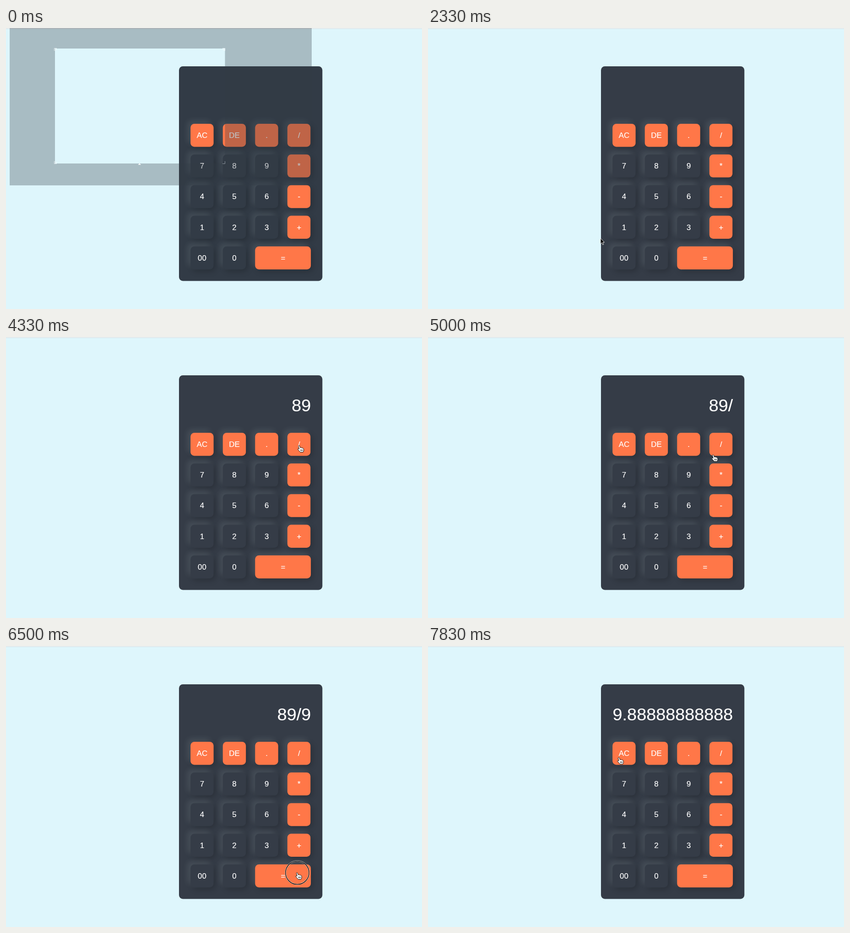
Write an HTML page that moves like this. It is 909 px wide and 616 px high and loops after 8 s.

```html
<!DOCTYPE html>
<html lang="en">
<head>
<meta charset="utf-8">
<title>Calculator</title>
<style>
html, body { margin: 0; width: 100%; height: 100%; overflow: hidden; }
body { position: relative; background: #def6fc; font-family: "Liberation Sans", Arial, sans-serif; color: #fff; }
body::before { content: ""; position: absolute; width: 100%; height: 1px; background: #f4f8f9; border-bottom: 1px solid #d3dcdf; }
#panel {
  position: absolute; left: 378px; top: 84px; width: 373.3px; height: 560px; border-radius: 10px;
  background: var(--dark); transform: scale(.84); transform-origin: 0 0; -webkit-text-stroke: .25px #fff;
}
#display { position: absolute; right: 30px; top: 49px; font-size: 45px; line-height: 60px; white-space: pre; }
.key {
  position: absolute; width: 60px; height: 60px; border-radius: 10px;
  background: var(--dark); font-size: 20px; line-height: 60px; text-align: center;
  box-shadow: -8px -8px 15px rgba(235,255,255,.1), 5px 5px 15px rgba(0,0,0,.2);
}
.op { background: #ff7748; }
.wide { width: 145px; }
svg { position: absolute; left: 0; top: 0; }
</style>
</head>
<body>
<div id="panel"><div id="display"></div></div>
<svg width="909" height="616" fill="none">
  <g id="selection">
    <path d="M8 0H668V345H8ZM107 45V297H478.5V45Z" fill="#323b46" fill-opacity=".31" fill-rule="evenodd"/>
    <path d="M105.5 50V44.5H111M108 50V47H111M473 44.5H478.5V50M473 47H476V50M105.5 292V297.5H111M108 292V295H111" stroke="#fff" stroke-opacity=".75"/>
    <path d="M473 297.5H478.5V292" stroke="#8d959d"/>
    <path d="M288.5 300L291.7 296.5L295 300Z" fill="#fff"/>
  </g>
  <g id="cursor">
    <g id="ring">
      <circle r="25.6" stroke="#fff" stroke-opacity=".75" stroke-width="2.8"/>
      <circle r="25.6" stroke="#111" stroke-width="1.5"/>
    </g>
    <path id="arrow" d="M0 0V12.2L2.8 9.6L4.8 14.2L6.8 13.3L4.9 8.9H8.5Z" fill="#000" stroke="#fff" stroke-width=".9"/>
    <g id="hand" stroke="#111" stroke-linejoin="round">
      <path d="M-2 1.2C-2-.4 .3-.5 .8 1L2.2 5C3.5 4 4.6 4.5 5 5.3C6 4.6 7 5 7.4 6C8.6 5.6 9.2 6.4 9.4 7.5L9.6 11L8.2 14.5H2L-1.5 10.5L-3.5 8C-3.8 6.6-2 6.4-.4 7.6Z" fill="#fff"/>
      <path d="M2.8 8.5V12M4.8 8.5V12M6.8 8.5V12" stroke-width=".9"/>
    </g>
  </g>
</svg>
<script>
const $ = id => document.getElementById(id);
const LOOP = 8000, STEPS_PER_MS = 0.006, LAST_STEP = 47;
const SCALE = 0.84, EDGE = 30, TOP = 150, DX = 84.1, DY = 80, SIZE = 60;

// Where the pointer rests, the step at which it presses, and what the display then shows
const start = { x: 82, y: 58.5 };
const stops = [
  { press: 13, x: 377, y: 461, shows: "" },
  { press: 17, x: 479.5, y: 301.5, shows: "8" },
  { press: 22, x: 570, y: 305, shows: "89" },
  { press: 27, x: 641, y: 238, shows: "89/" },
  { press: 35, x: 573.5, y: 316.5, shows: "89/9" },
  { press: 39, x: 636.5, y: 497, shows: (89 / 9).toFixed(20).slice(0, 13) },
  { press: 48, x: 417.5, y: 244.5, shows: "" }
];

"AC DE . / 7 8 9 * 4 5 6 - 1 2 3 + 00 0 =".split(" ").forEach((label, i) => {
  const key = document.createElement("div");
  key.className = "key" + (/\D/.test(label) ? " op" : "") + (label === "=" ? " wide" : "");
  key.textContent = label;
  key.style.left = EDGE + i % 4 * DX + "px";
  key.style.top = TOP + Math.floor(i / 4) * DY + "px";
  $("panel").append(key);
});

function cursorAt(step) {
  if (step < 2) return start;
  const i = stops.findIndex(s => s.press > step);
  const to = stops[i], from = stops[i - 1] || to;
  // Rest one step either side of a press
  const leave = from.press + 1, arrive = to.press - 1;
  const k = Math.max(0, Math.min(1, (step - leave) / (arrive - leave)));
  const ease = k * k * (3 - 2 * k);
  return { x: from.x + (to.x - from.x) * ease, y: from.y + (to.y - from.y) * ease };
}

function overKey({ x, y }) {
  const dx = (x - 378) / SCALE - EDGE, dy = (y - 84) / SCALE - TOP;
  if (dx < 0 || dy < 0 || dx > 313 || dy > 380) return false;
  const wide = dy > 4 * DY && dx > 2 * DX;
  return dy % DY < SIZE && (wide || dx % DX < SIZE);
}

function show(id, on) { $(id).style.display = on ? "" : "none"; }

function draw(time) {
  const step = Math.min(LAST_STEP, Math.floor((time % LOOP + 4) * STEPS_PER_MS));
  const cursor = cursorAt(step), hover = overKey(cursor);
  const done = stops.filter(s => s.press < step).pop();
  document.body.style.setProperty("--dark", step ? "#353c47" : "#323b46");
  $("display").textContent = done ? done.shows : "";
  $("cursor").setAttribute("transform", `translate(${cursor.x} ${cursor.y})`);
  show("selection", step === 0);
  show("cursor", step > 0);
  show("hand", hover);
  show("arrow", !hover);
  show("ring", hover && stops.some(s => s.press === step));
}

const begun = performance.now();
function tick() {
  draw(performance.now() - begun);
  requestAnimationFrame(tick);
}
tick();
</script>
</body>
</html>
```
